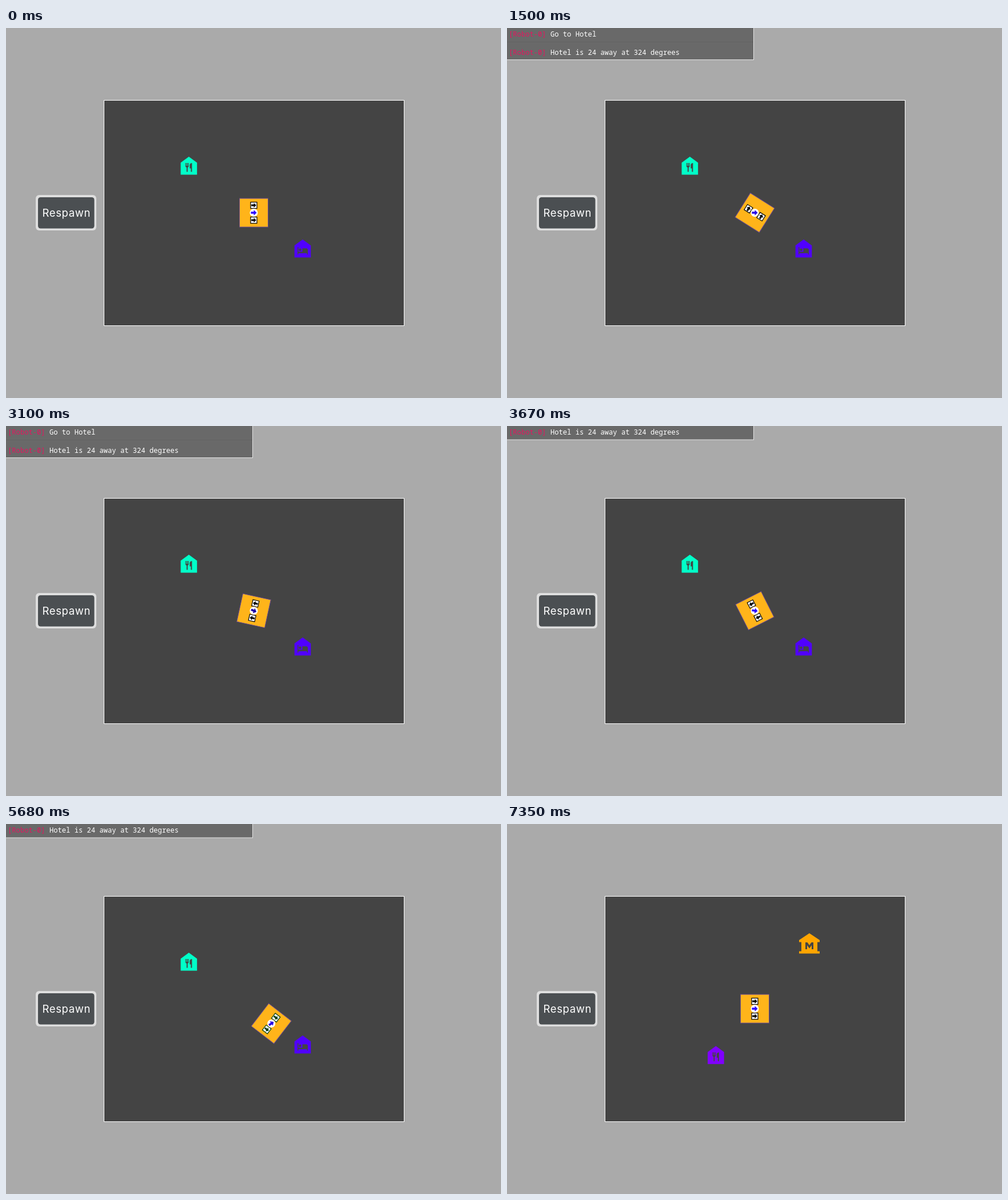
An HTML page that plays this animation: 866x647 px, repeating every 8 s.

```html
<!DOCTYPE html>
<html lang="en">
<head>
<meta charset="utf-8">
<title>Robot</title>
<style>
  html, body { margin: 0; width: 100%; height: 100%; overflow: hidden; background: #aaa; }
  svg { display: block; }
  .log { font: 12.17px "Noto Sans Mono", "DejaVu Sans Mono", monospace; fill: #fff; white-space: pre; }
  .log tspan { fill: #e3175f; }
  .button { font: 18.5px Inter, "Open Sans", sans-serif; letter-spacing: .6px; fill: #fff; }
</style>
</head>
<body>
<svg width="866" height="647" viewBox="0 0 866 647">
  <defs>
    <path id="house" d="M0 0L14.3 10.5V31.5H-14.3V10.5Z"/>
    <path id="cutlery" fill="#444" d="M-6 11h1.2v5h1v-5h1.4v5h1v-5h1.2v5.5q0 2-1.9 2.4v7.6h-1.9v-7.6q-2-.4-2-2.4zM5.5 11v15.5h-2v-6h-2v-5.500q0-3.500 4-4z"/>
    <path id="arrow" d="M-5-1.8H0V-4.800L5 0L0 4.800V1.800H-5Z"/>
    <g id="wheel">
      <rect x="-5.5" y="-5.5" width="11" height="11" fill="#fff" stroke="currentColor" stroke-width="1.2"/>
      <use href="#arrow" fill="currentColor" transform="scale(.85)"/>
    </g>
  </defs>

  <rect x="171.5" y="126.5" width="525" height="394" fill="#444" stroke="#fff"/>

  <rect x="52" y="292" width="106" height="62" rx="6" fill="#dedede"/>
  <rect x="56" y="296" width="98.500" height="54.500" rx="4.500" fill="#4b4f52"/>
  <text class="button" x="105.800" y="330" text-anchor="middle">Respawn</text>

  <g id="before">
    <g transform="translate(319.900 225)">
      <use href="#house" fill="#00ffc8"/><use href="#cutlery"/>
    </g>
    <g transform="translate(519 369.700)">
      <use href="#house" fill="#5000ff"/>
      <path fill="#444" d="M-9 13.500h1.500v8H-.500V15.500H6q3 0 3 3V26.500H7.500V24h-15v2.500H-9z"/>
      <circle cx="-4.500" cy="18" r="2.200" fill="#444"/>
    </g>
  </g>
  <g id="after">
    <g transform="translate(365.400 388.300)">
      <use href="#house" fill="#8000ff"/><use href="#cutlery"/>
    </g>
    <path fill="#ffa500" d="M529 191L547 203V206.500H543V222.500H547V226.500H511V222.500H515V206.500H511V203Z"/>
    <path fill="#444" d="M522 219V207h3.500l3.500 5 3.500-5h3.500v12h-3v-7l-4 5.500-4-5.500v7z"/>
  </g>

  <g id="robot">
    <rect x="-25" y="-25" width="50" height="50" fill="#ffb41a" stroke="#6a4a90"/>
    <use href="#wheel" y="-13"/>
    <use href="#wheel" y="13"/>
    <circle r="7" fill="#fff"/>
    <use id="needle" href="#arrow"/>
  </g>

  <g id="log" class="log">
    <rect id="panel" x="-2" y="-2" width="433.500" fill="#696969" stroke="#e4e4e4"/>
    <path id="divider" d="M0 24.500H431" stroke="#626262"/>
    <text id="first" x="3" y="14.500"><tspan>[Robot-0]</tspan> Go to Hotel</text>
    <text id="second" x="3"><tspan>[Robot-0]</tspan> Hotel is 24 away at 324 degrees</text>
  </g>
</svg>
<script>
const LOOP = 8000, RESPAWN = 6900;
const TURN_START = 659, TURN_SPEED = 0.06866, TURN_END = 322.4;
const MOVE_START = 5325, MOVE_SPEED = 0.1128, MOVE_END = 104.7, COURSE = 40.2 * Math.PI / 180;
// time, needle angle on the stage, needle lightness
const NEEDLE = [[660, 0, 50], [1500, 0, 45], [2450, 40, 12], [3670, 8, 50], [4820, 0, 3], [5680, -35, 45]];

const el = id => document.getElementById(id);
const clamp = (v, max) => Math.min(Math.max(v, 0), max);
const show = (id, on) => el(id).style.display = on ? '' : 'none';

function keyed(keys, t, column) {
  const next = keys.findIndex(k => k[0] > t);
  if (next === 0) return keys[0][column];
  if (next < 0) return keys[keys.length - 1][column];
  const a = keys[next - 1], b = keys[next];
  return a[column] + (b[column] - a[column]) * (t - a[0]) / (b[0] - a[0]);
}

function drawRobot(t) {
  const reset = t >= RESPAWN;
  const heading = reset ? 0 : -clamp((t - TURN_START) * TURN_SPEED, TURN_END);
  const dist = reset ? 0 : clamp((t - MOVE_START) * MOVE_SPEED, MOVE_END);
  const x = 433.5 + dist * Math.cos(COURSE), y = 323 + dist * Math.sin(COURSE);
  el('robot').setAttribute('transform', `translate(${x} ${y}) rotate(${heading})`);
  el('robot').style.color = dist > 0 && dist < MOVE_END ? '#003c0a' : '#000';
  const needle = reset ? 0 : keyed(NEEDLE, t, 1);
  el('needle').setAttribute('transform', `rotate(${needle - heading})`);
  el('needle').setAttribute('fill', `hsl(250 100% ${reset ? 50 : keyed(NEEDLE, t, 2)}%)`);
}

function drawLog(t) {
  const first = t >= 500 && t < 3500, second = t >= 560 && t < 6500;
  const both = first && second;
  show('log', first || second);
  show('first', first);
  show('second', second);
  show('divider', both);
  el('panel').setAttribute('height', both ? 57.5 : 26);
  el('second').setAttribute('y', both ? 46.5 : 14.5);
}

function frame() {
  const t = performance.now() % LOOP;
  show('before', t < RESPAWN);
  show('after', t >= RESPAWN);
  drawRobot(t);
  drawLog(t);
  requestAnimationFrame(frame);
}
frame();
</script>
</body>
</html>
```
